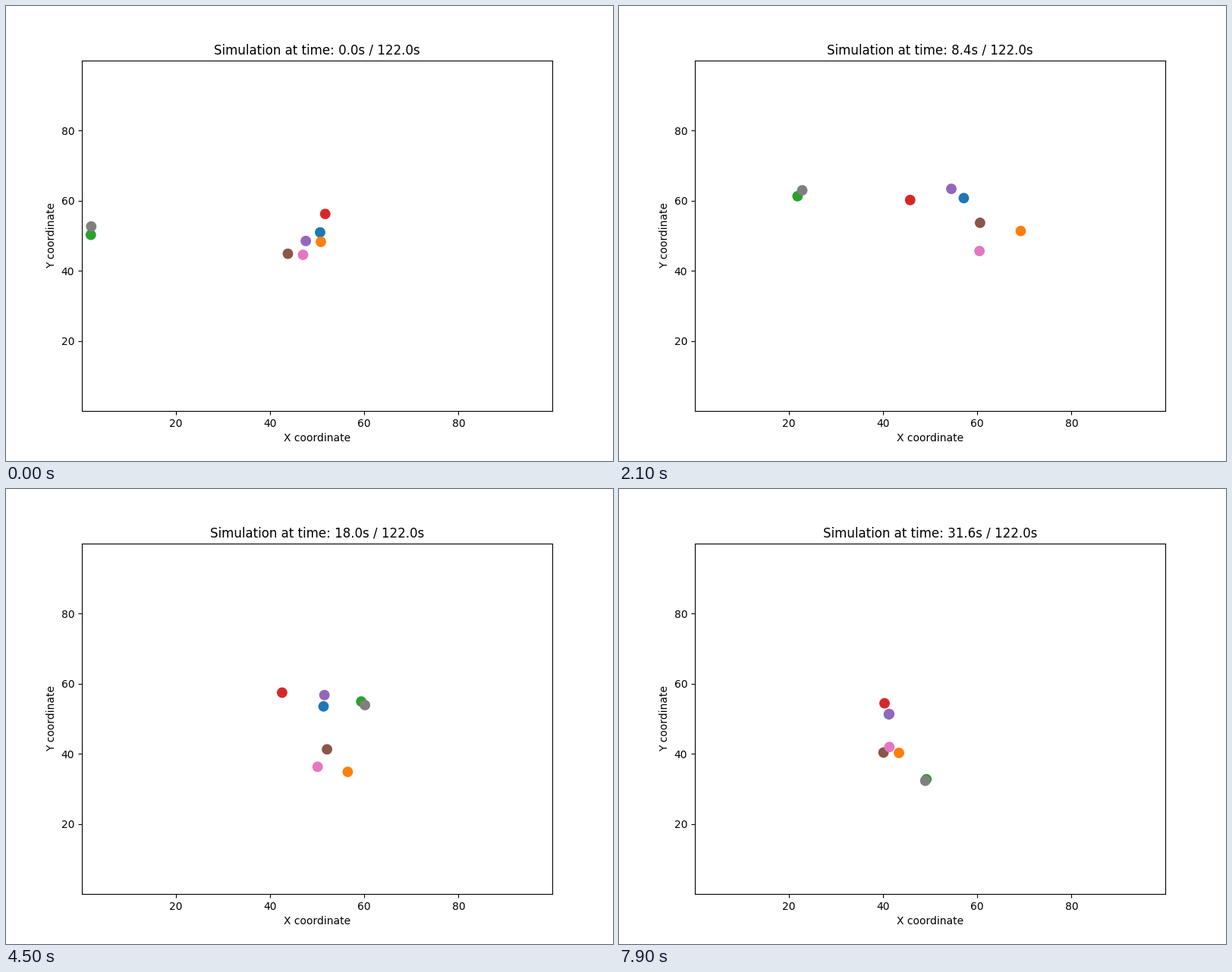
Animation of 800x600 px, one loop 8 s. Source, as a matplotlib script:

```python
import numpy as np
import matplotlib.pyplot as plt
from matplotlib.animation import FuncAnimation

FRAMES, INTERVAL = 80, 100
STEP, TOTAL = 0.4, 122.0
LOW, HIGH = 0.1, 99.9
KEYS = np.array([0, 1.4, 2.8, 4.5, 6, 7.9])  # seconds
DECAY, FREQ, SETTLE = 0.25, 0.635, 4.5


def basis(t):
    """Damped swing about a rest point, plus a start-up push that dies out."""
    damp = np.exp(-DECAY * t)
    push = np.clip(1 - t / SETTLE, 0, None)
    return np.stack([np.ones_like(t), damp * np.cos(FREQ * t),
                     damp * np.sin(FREQ * t),
                     push**2, push**3, push**4], axis=1)


def swing(*points):
    """Track through stage points reached at KEYS."""
    return basis(t) @ np.linalg.solve(basis(KEYS), np.array(points, float))


def offset(x, y):
    return np.stack([x, y], axis=1)


def orbit(radius, angle):
    return offset(radius * np.cos(angle), radius * np.sin(angle))


def to_data(p):
    span = HIGH - LOW
    return np.stack([LOW + (p[..., 0] - 100) * span / 620,
                     LOW + (534 - p[..., 1]) * span / 462], axis=-1)


t = np.arange(FRAMES) * INTERVAL / 1000
fade = np.exp(-(t / 6.5)**2)

blue = swing((414, 298.5), (447.5, 256), (450.7, 259),
             (418.5, 286.7), (385.5, 302.3), (355.7, 297))
orange = swing((415, 311), (519.3, 280.8), (516.3, 321.2),
               (450.4, 373), (402.4, 376.3), (369, 348))
green = swing((111.8, 301.7), (159.8, 263.3), (321.3, 248.4),
              (468.2, 280.2), (467, 338.2), (405.2, 382.7))
red = swing((420.7, 274.2), (392.2, 258.9), (376.3, 257.2),
            (363.9, 268.5), (357.7, 276.1), (350, 282.6))
brown = swing((371.5, 326.7), (461.8, 282.8), (470.6, 299.2),
              (423.1, 343.3), (381, 361.3), (348.6, 347.5))

# the other three circle a partner and close in on it
purple = blue + orbit(22 * (1 - (t / 8)**2), 2.6 + 0.628 * t - 0.0314 * t**2)
pink = brown + offset(20 * np.cos(0.77 * t) * (1 - t / 13),
                      1.4 * fade + 46 * np.sin(0.5 * t) * fade)
gray = green + orbit(11 * fade, 0.35 - 1.87 * np.cos(0.4 * t))

dots = to_data(np.stack([blue, orange, green, red, purple, brown, pink, gray],
                        axis=1))

fig, ax = plt.subplots(figsize=(8, 6), dpi=100)
ticks = range(20, 100, 20)
ax.set(xlim=(LOW, HIGH), ylim=(LOW, HIGH), xticks=ticks, yticks=ticks,
       xlabel="X coordinate", ylabel="Y coordinate")
title = ax.set_title("")
swarm = ax.scatter(*dots[0].T, s=80, c=[f"C{i}" for i in range(8)])


def update(i):
    swarm.set_offsets(dots[i])
    title.set_text(f"Simulation at time: {i * STEP:.1f}s / {TOTAL}s")
    return swarm, title


anim = FuncAnimation(fig, update, frames=FRAMES, interval=INTERVAL,
                     repeat=True, repeat_delay=0)
plt.show()
```
